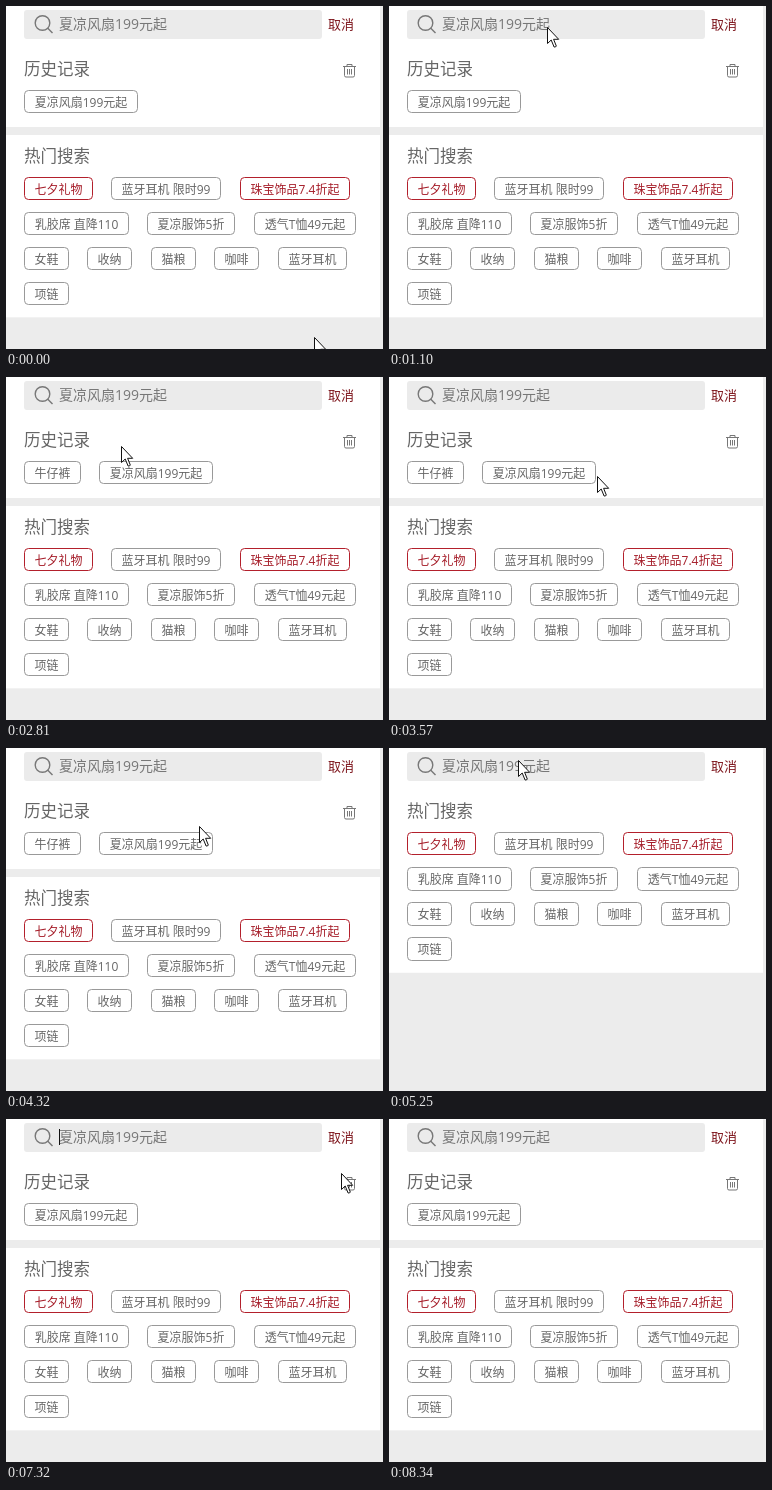
Recreate the animation shown at these times as an HTML page. Size 377 by 343 pixels, loop 8420 ms.

```html
<!DOCTYPE html>
<html lang="zh-CN">
<head>
<meta charset="utf-8">
<title>搜索</title>
<style>
  html, body { margin: 0; width: 100%; height: 100%; overflow: hidden; background: #ececec; }
  svg { display: block; width: 377px; height: 343px; }
  text { font-family: "Open Sans", "Noto Sans CJK SC", "Noto Sans CJK", sans-serif; fill: #666; }
  .panel { fill: #fff; }
  .tag rect { fill: #fff; stroke: #999; }
  .tag text { font-size: 12px; text-anchor: middle; }
  .hot rect { stroke: #b3202c; }
  .hot text { fill: #a51c28; }
  .heading { font-size: 16.5px; }
  .row text { font-size: 24px; fill: #929292; }
  .row path { stroke: #e9e9e9; }
  .icon { fill: none; stroke: #777; }
  #placeholder, #typed { font-size: 14px; fill: #777; }
  #typed { font-family: "Liberation Sans", Arial, sans-serif; fill: #111; }
  #cancel { font-size: 13px; fill: #7c1219; }
</style>
</head>
<body>
<svg viewBox="0 0 377 343">
  <rect width="377" height="343" fill="#ececec"/>
  <rect class="panel" width="374" height="42"/>
  <g id="history">
    <rect class="panel" y="42" width="374" height="79"/>
    <text class="heading" x="18" y="69">历史记录</text>
    <g class="icon">
      <path d="M337 60.5h13M341 60v-1.5h5V60M338.5 61v8.5q0 1.5 1.5 1.5h7q1.5 0 1.5-1.5V61"/>
      <path d="M341.5 63v5.5m2-5.5v5.5m2-5.5v5.5"/>
    </g>
    <g id="oneTag"></g>
    <g id="twoTags"></g>
  </g>
  <g id="hotLower"></g>
  <g id="hotUpper"></g>
  <g id="firstList"></g>
  <g id="finalList"></g>

  <rect x="18" y="4" width="298" height="29" rx="3" fill="#ebebeb"/>
  <g class="icon" stroke-width="1.4">
    <circle cx="36.5" cy="17" r="7.3"/>
    <path d="M41.8 22.3L46.500 27"/>
  </g>
  <text id="placeholder" x="53" y="23">夏凉风扇199元起</text>
  <text id="typed" x="53" y="23"></text>
  <g id="clear">
    <circle cx="304" cy="19" r="8.5" fill="#c8c8c8"/>
    <path d="M300.5 15.500l7 7m0-7l-7 7" stroke="#f2f2f2" stroke-width="1.3"/>
  </g>
  <rect id="caret" y="10" width="1" height="16" fill="#111"/>
  <text id="cancel" x="322" y="23">取消</text>
  <path id="cursor" d="M.5 .5V16.500L4.200 13 7.100 20Q8.700 20.500 9.300 19L6.600 12.300H11.700Z"
        fill="#fff" stroke="#111" stroke-linejoin="round"/>
</svg>
<script>
const LOOP = 8420;
const LEFT = 18;
const TAG = { padding: 21, gap: 18.5, height: 23.45, pitch: 35.1 };
const ROW = 47.8;
const $ = id => document.getElementById(id);
const add = (id, markup) => $(id).insertAdjacentHTML('beforeend', markup);

// Flows tags from left to right; a leading "!" marks a promoted one.
function tagRow(id, labels, y) {
  const top = Math.round(y);
  const height = Math.round(y + TAG.height) - top;
  let x = LEFT;
  for (const label of labels.split('|')) {
    add(id, `<g class="tag ${label[0] === '!' ? 'hot' : ''}">
      <rect y="${top + .5}" height="${height - 1}" rx="4"/>
      <text y="${top + height / 2 + 5}">${label.replace('!', '')}</text></g>`);
    const [box, text] = $(id).lastElementChild.children;
    const width = Math.ceil(text.getComputedTextLength() - .1) + TAG.padding;
    box.setAttribute('x', Math.floor(x) + .5);
    box.setAttribute('width', width - 1);
    text.setAttribute('x', Math.floor(x) + width / 2);
    x += width + TAG.gap;
  }
}

function hotPanel(id, top, bottom) {
  add(id, `<rect class="panel" y="${top}" width="374" height="${bottom - top}"/>
    <text class="heading" x="${LEFT}" y="${top + 27}">热门搜索</text>`);
  [
    '!七夕礼物|蓝牙耳机 限时99|!珠宝饰品7.4折起',
    '乳胶席 直降110|夏凉服饰5折|透气T恤49元起',
    '女鞋|收纳|猫粮|咖啡|蓝牙耳机',
    '项链'
  ].forEach((labels, i) => tagRow(id, labels, bottom - 140.8 + TAG.pitch * i));
}

function list(id, words) {
  add(id, '<rect class="panel" y="42" width="374" height="301"/>');
  words.split('|').forEach((word, i) => {
    const y = i * ROW;
    add(id, `<g class="row"><text x="17.5" y="${Math.floor(74.5 + y)}">${word}</text>
      <path d="M${LEFT} ${Math.round(89 + y) + .5}H355"/></g>`);
  });
}

tagRow('oneTag', '夏凉风扇199元起', 84);
tagRow('twoTags', '牛仔裤|夏凉风扇199元起', 84);
hotPanel('hotLower', 129, 311.3);
hotPanel('hotUpper', 42, 224.8);
list('firstList', '女鞋|女款|女生|男鞋|女包|内裤|女士鞋');
list('finalList', '牛仔裤|牛仔裤女|牛奶|牛肉干|牛仔外套|牛油果|牛仔裙');

// Pointer moves: start, end, destination
const START = [308, 331];
const moves = [
  [20, 640, 158, 21],
  [2360, 2650, 115, 69],
  [2840, 3080, 22, 85],
  [3250, 3700, 252, 102],
  [3700, 4110, 69, 105],
  [4110, 4320, 193, 78],
  [4320, 4930, 345, 62],
  [4960, 5250, 129, 12],
  [5810, 6280, 328, 130],
  [6280, 6790, 193, 58],
  [6790, 7510, 362, 53],
  [7530, 7640, 345, 287],
  [7840, 8140, 355, 344]
];
const ease = k => (1 - Math.cos(Math.PI * k)) / 2;

function pointerAt(t) {
  let [x, y] = START;
  for (const [start, end, toX, toY] of moves) {
    if (t < start) break;
    const k = ease(Math.min(1, (t - start) / (end - start)));
    x += (toX - x) * k;
    y += (toY - y) * k;
  }
  return [Math.round(x), Math.round(y)];
}

const WORD = 'niu';
const KEY = { first: 1390, gap: 75 };
const BLINK = 505;
const FOCUS = 595, REFOCUS = 5810;
const SUGGEST = 1740, REFINE = 1820, PICK = 2810, ERASE = 4970, SUBMIT = 7000;

const within = (t, from, to) => t >= from && t < to;
const show = (id, on) => $(id).setAttribute('display', on ? 'inline' : 'none');

// The blink restarts with every key press.
function caretVisible(t, letters) {
  if (t < FOCUS || within(t, PICK, REFOCUS)) return false;
  const since = t >= REFOCUS ? REFOCUS
    : letters ? KEY.first + (letters - 1) * KEY.gap : FOCUS;
  return (t - since) % (2 * BLINK) < BLINK;
}

function draw(t) {
  const typing = within(t, KEY.first, PICK);
  const erased = within(t, ERASE, SUBMIT);
  const picked = within(t, PICK, ERASE);
  const letters = typing
    ? Math.min(WORD.length, 1 + Math.floor((t - KEY.first) / KEY.gap)) : 0;

  show('history', !typing && !erased);
  show('twoTags', picked);
  show('oneTag', !picked);
  show('hotLower', !typing && !erased);
  show('hotUpper', erased);
  show('firstList', within(t, SUGGEST, REFINE));
  show('finalList', within(t, REFINE, PICK));
  show('placeholder', !typing);
  show('clear', typing);

  $('typed').textContent = WORD.slice(0, letters);
  $('caret').setAttribute('x', 53 + Math.round($('typed').getComputedTextLength()));
  show('caret', caretVisible(t, letters));
  $('cursor').setAttribute('transform', `translate(${pointerAt(t)})`);
}

function tick() {
  draw(performance.now() % LOOP);
  requestAnimationFrame(tick);
}
tick();
</script>
</body>
</html>
```
